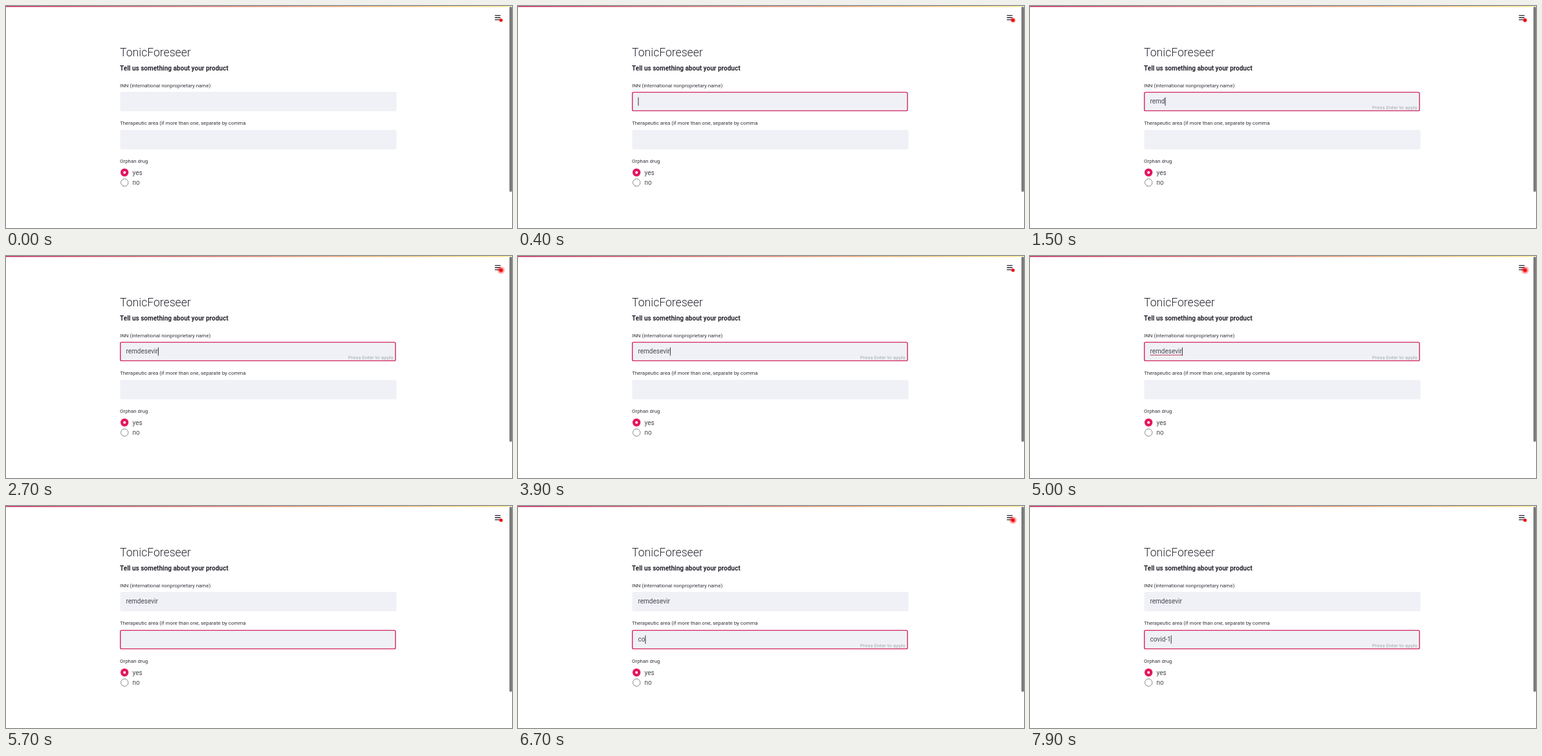
Recreate the animation shown at these times as an HTML page. Size 782 px wide and 344 px high, loop 8 s.

```html
<!DOCTYPE html>
<html lang="en">
<head>
<meta charset="utf-8">
<title>Product form</title>
<style>
html, body { margin: 0; width: 100%; height: 100%; overflow: hidden; background: #fff; }
svg { display: block; font: 7.93px Roboto, "Open Sans", sans-serif; fill: #33343c; }
.title { font-size: 17.6px; font-weight: 300; fill: #262730; }
.head { font-size: 10px; font-weight: 700; fill: #262730; }
.value { font-size: 10px; fill: #484952; }
.hint { font-size: 7.9px; fill: #a9abb3; text-anchor: end; }
.box { fill: #f0f1f6; }
.ring { fill: none; stroke: #cf2661; stroke-width: 1.4; }
.caret { stroke: #33343c; stroke-width: 1; }
.wavy { stroke: #c2405e; stroke-width: 1; }
</style>
</head>
<body>
<svg width="782" height="344" viewBox="0 0 782 344">
  <defs>
    <linearGradient id="bar">
      <stop offset="0" stop-color="#c22b62"/>
      <stop offset="1" stop-color="#fbeb8c"/>
    </linearGradient>
    <radialGradient id="halo">
      <stop offset=".4" stop-color="#f00" stop-opacity=".6"/>
      <stop offset="1" stop-color="#f00" stop-opacity="0"/>
    </radialGradient>
  </defs>
  <rect width="778" height="1.5" fill="url(#bar)"/>
  <rect x="778" y="1" width="4" height="287" rx="2" fill="#7b7b7b"/>
  <path d="M755.5 14.6h8.7M755.5 18h8.7M755.5 21.4h8.7" stroke="#262730" stroke-width="1.3"/>
  <circle id="glow" cx="765" cy="22" fill="url(#halo)"/>
  <circle cx="765" cy="22" r="2.6" fill="#f00a14"/>

  <text class="title" x="176" y="77.5">TonicForeseer</text>
  <text class="head" x="176" y="100">Tell us something about your product</text>
  <text x="176" y="125.5">INN (international nonproprietary name)</text>
  <text x="176" y="184.3">Therapeutic area (if more than one, separate by comma</text>
  <g id="fields"></g>
  <text x="176" y="243">Orphan drug</text>
  <circle cx="183.2" cy="258" r="6.2" fill="#e3175f"/>
  <circle cx="183.2" cy="258" r="2" fill="#fff"/>
  <text class="value" x="195.5" y="261.5">yes</text>
  <circle cx="183.2" cy="273.6" r="5.7" fill="#fff" stroke="#85868c"/>
  <text class="value" x="195.5" y="277">no</text>
</svg>
<script>
const LOOP = 8000, BLINK = 1000, LEFT = 185.5;

const fields = [
  { y: 133, word: "remdesevir", focus: 300, blur: 5100, wavyAt: 4400,
    keys: Array.from({ length: 10 }, (_, i) => 665 + 215 * i) },
  { y: 192, word: "covid-1", focus: 5100, blur: LOOP, wavyAt: LOOP,
    keys: [6200, 6650, 7050, 7300, 7450, 7650, 7850] }
];

function add(parent, tag, attrs) {
  const el = document.createElementNS("http://www.w3.org/2000/svg", tag);
  for (const name in attrs) el.setAttribute(name, attrs[name]);
  return parent.appendChild(el);
}

const show = (el, on) => el.setAttribute("visibility", on ? "visible" : "hidden");

const group = document.getElementById("fields");
const glow = document.getElementById("glow");

for (const f of fields) {
  f.box = add(group, "rect", { class: "box", x: 176.5, y: f.y, width: 427, height: 30, rx: 2 });
  f.ring = add(group, "rect", { class: "ring", x: 176.7, y: f.y + .6, width: 425.2, height: 28.8, rx: 2 });
  f.text = add(group, "text", { class: "value", x: LEFT, y: f.y + 18.4 });
  f.wavy = add(group, "path", { class: "wavy" });
  f.caret = add(group, "path", { class: "caret" });
  f.hint = add(group, "text", { class: "hint", x: 598.5, y: f.y + 26.8 });
  f.hint.textContent = "Press Enter to apply";
}

function drawField(f, t) {
  const focused = t >= f.focus && t < f.blur;
  const count = f.keys.filter(k => k <= t).length;
  const lastInput = count ? f.keys[count - 1] : f.focus;
  f.text.textContent = f.word.slice(0, count);
  const end = LEFT + (count ? f.text.getComputedTextLength() : 0) + .5;
  f.box.setAttribute("width", focused ? 425.5 : 427);
  f.caret.setAttribute("d", `M${end} ${f.y + 8.5}v13`);
  f.wavy.setAttribute("d", `M${LEFT} ${f.y + 20.5}H${end}`);
  show(f.ring, focused);
  show(f.hint, focused && count > 0);
  show(f.wavy, focused && t >= f.wavyAt);
  show(f.caret, focused && (t - lastInput) % BLINK < BLINK / 2);
}

function frame() {
  const t = performance.now() % LOOP;
  for (const f of fields) drawField(f, t);
  const pulse = (1 - Math.cos(2 * Math.PI * (t + 100) / 2000)) / 2;
  glow.setAttribute("r", 2.6 + 4.4 * pulse);
  requestAnimationFrame(frame);
}
frame();
</script>
</body>
</html>
```
